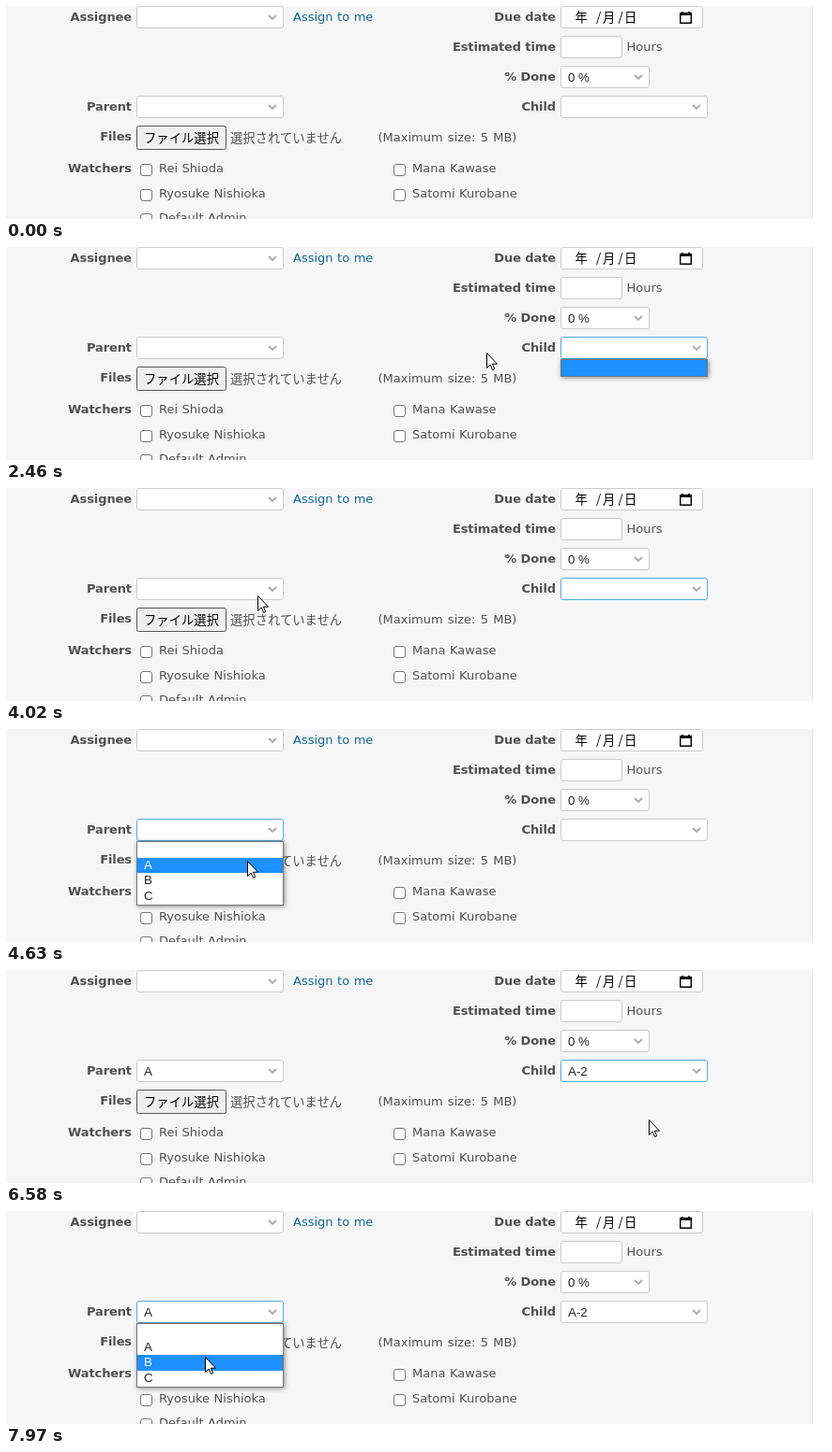
Write an HTML page that moves like this. It is 874 px wide and 228 px high and loops after 8 s.

```html
<!DOCTYPE html>
<html lang="en">
<head>
<meta charset="utf-8">
<title>Dependent list fields</title>
<style>
html, body { margin: 0; width: 100%; height: 100%; overflow: hidden; background: #fff; }
svg { display: block; }
text { font: 13px "DejaVu Sans", sans-serif; fill: #505050; word-spacing: .4px; white-space: pre; }
.label { font-weight: bold; text-anchor: end; letter-spacing: -.1px; word-spacing: 0; }
.link { fill: #169; }
.note { word-spacing: 1.1px; }
.ui { font: 13.33px "Liberation Sans", Arial, sans-serif; fill: #222; word-spacing: 0; }
.jp { font: 300 13.33px "Noto Sans CJK JP", "Noto Sans CJK", sans-serif; word-spacing: 0; }
.dark { fill: #000; }
.active { fill: #fff; }
.shadow { filter: drop-shadow(1px 1px 2.5px rgba(0, 0, 0, .45)); }
</style>
</head>
<body>
<svg width="874" height="228" viewBox="0 0 874 228">
  <rect width="859" height="228" fill="#f6f6f6"/>
  <path d="M859.5 0V228" stroke="#e4e4e4"/>
  <g id="form"></g>
  <g id="live"></g>
  <path id="cursor" d="M.5 .5V16.5L4.2 13L6.6 18.5L8.7 17.6L6.4 12.2H11.5Z" fill="#fff" stroke="#000"/>
</svg>
<script>
const $ = id => document.getElementById(id);

const text = (x, y, s, cls = '') => `<text x="${x}" y="${y}" class="${cls}">${s}</text>`;

const box = (x, y, w, h, stroke = '#ccc', r = 2.5, fill = '#fff') =>
  `<rect x="${x + .5}" y="${y + .5}" width="${w - 1}" height="${h - 1}" rx="${r}" fill="${fill}" stroke="${stroke}"/>`;

const select = (x, y, w, value = '', focus = false) =>
  box(x, y, w, 24, focus ? '#5ad' : '#ccc') + text(x + 8, y + 17, value, 'ui') +
  `<path d="M${x + w - 16} ${y + 10}l4 4l4 -4" fill="none" stroke="#aaa" stroke-width="1.8"/>`;

const check = (x, y, name) => box(x, y - 9, 13, 13, '#767676') + text(x + 20, y, name);

const calendar = `<path d="M718.7 7.7h11.6v10.6h-11.6z" fill="none" stroke="#000" stroke-width="1.4"/>
  <path d="M718 7h13v3h-13zM720 6h2v2h-2zM727 6h2v2h-2z"/>`;

$('form').innerHTML = [
  ...[[134, 16, 'Assignee'], [586, 16, 'Due date'], [586, 48, 'Estimated time'], [586, 80, '% Done'],
    [134, 112, 'Parent'], [586, 112, 'Child'], [134, 144, 'Files'], [134, 178, 'Watchers']
  ].map(([x, y, s]) => text(x, y, s, 'label')),
  select(139, 0, 157), text(306, 16, 'Assign to me', 'link'),
  box(591, 0, 152, 24), calendar,
  ...[[606.5, '年'], [629, '/'], [636, '月'], [652.5, '/'], [659, '日']].map(([x, s]) => text(x, 17, s, 'jp dark')),
  box(591, 32, 66, 24), text(661.5, 48, 'Hours'),
  select(591, 64, 95, '0 %'),
  box(139, 128, 96, 26, '#555', 2, '#efefef'),
  text(147, 145.5, 'ファイル選択', 'jp dark'), text(239, 145.5, '選択されていません', 'jp'),
  text(396.5, 145, '(Maximum size: 5 MB)', 'note'),
  check(143, 178, 'Rei Shioda'), check(413, 178, 'Mana Kawase'),
  check(143, 205, 'Ryosuke Nishioka'), check(413, 205, 'Satomi Kurobane'),
  check(143, 231, 'Default Admin')
].join('');

// Pointer moves: first step at, last step at, step count, destination
const start = [654, 228];
const moves = [
  [70, 760, 10, 283, 113],
  [1690, 1690, 1, 340, 112],
  [1770, 2080, 5, 722, 115],
  [2230, 2470, 4, 459, 112],
  [2550, 2780, 4, 724, 116],
  [3330, 3330, 1, 725, 118],
  [3410, 4010, 9, 268, 115],
  [4170, 4400, 4, 257, 140],
  [4630, 4630, 1, 257, 141],
  [4800, 5410, 9, 701, 116],
  [5810, 6270, 7, 685, 160],
  [6740, 7190, 7, 260, 109],
  [7430, 7970, 8, 212, 156]
];
const ease = p => (p + p * p * (3 - 2 * p)) / 2;

function pointer(t) {
  let [x, y] = start;
  for (const [t0, t1, n, tx, ty] of moves) {
    if (t < t0) break;
    const gap = (t1 - t0) / (n - 1) || 1;
    const p = ease(Math.min(n, 1 + Math.floor((t - t0) / gap + .01)) / n);
    x += (tx - x) * p;
    y += (ty - y) * p;
  }
  return [Math.round(x), Math.round(y)];
}

// Last entry whose time has come
const at = (log, t) => log.filter(e => e[0] <= t).pop()[1];
const focusLog = [[0, ''], [910, 'parent'], [2080, 'child'], [4090, 'parent'], [5560, 'child'], [7350, 'parent']];
const openLog = [[0, ''], [910, 'parent'], [2080, ''], [2230, 'child'], [3330, ''], [4090, 'parent'],
  [4800, ''], [5560, 'child'], [6580, ''], [7350, 'parent']];

function popup(x, options, value, [px, py]) {
  const top = i => Math.round(121 + i * 50 / 3);
  const inside = px > x && px < x + 157 && py > 120 && py < top(options.length);
  const active = inside ? options.findIndex((_, i) => py < top(i + 1)) : options.indexOf(value);
  return `<g class="shadow">${box(x, 120, 157, top(options.length) - 119, '#767676', 0)}</g>` +
    `<rect x="${x + 1}" y="${top(active)}" width="155" height="${top(active + 1) - top(active)}" fill="#1e90ff"/>` +
    options.map((s, i) => text(x + 8, top(i) + 12, s, i === active ? 'ui active' : 'ui')).join('');
}

let last;
function draw(t) {
  const pos = pointer(t), focus = at(focusLog, t), open = at(openLog, t);
  const parent = t < 4800 ? '' : 'A', child = t < 6580 ? '' : 'A-2';
  const html = select(139, 96, 157, parent, focus === 'parent') + select(591, 96, 157, child, focus === 'child') +
    (open === 'parent' ? popup(139, ['', 'A', 'B', 'C'], parent, pos) : '') +
    (open === 'child' ? popup(591, parent ? ['', 'A-1', 'A-2'] : [''], child, pos) : '');
  if (html !== last) $('live').innerHTML = last = html;
  $('cursor').setAttribute('transform', `translate(${pos})`);
  $('cursor').style.display = t < 70 ? 'none' : '';
}

const origin = performance.now();
function tick(now) {
  draw(Math.max(0, now - origin) % 8000);
  requestAnimationFrame(tick);
}
tick(origin);
</script>
</body>
</html>
```
